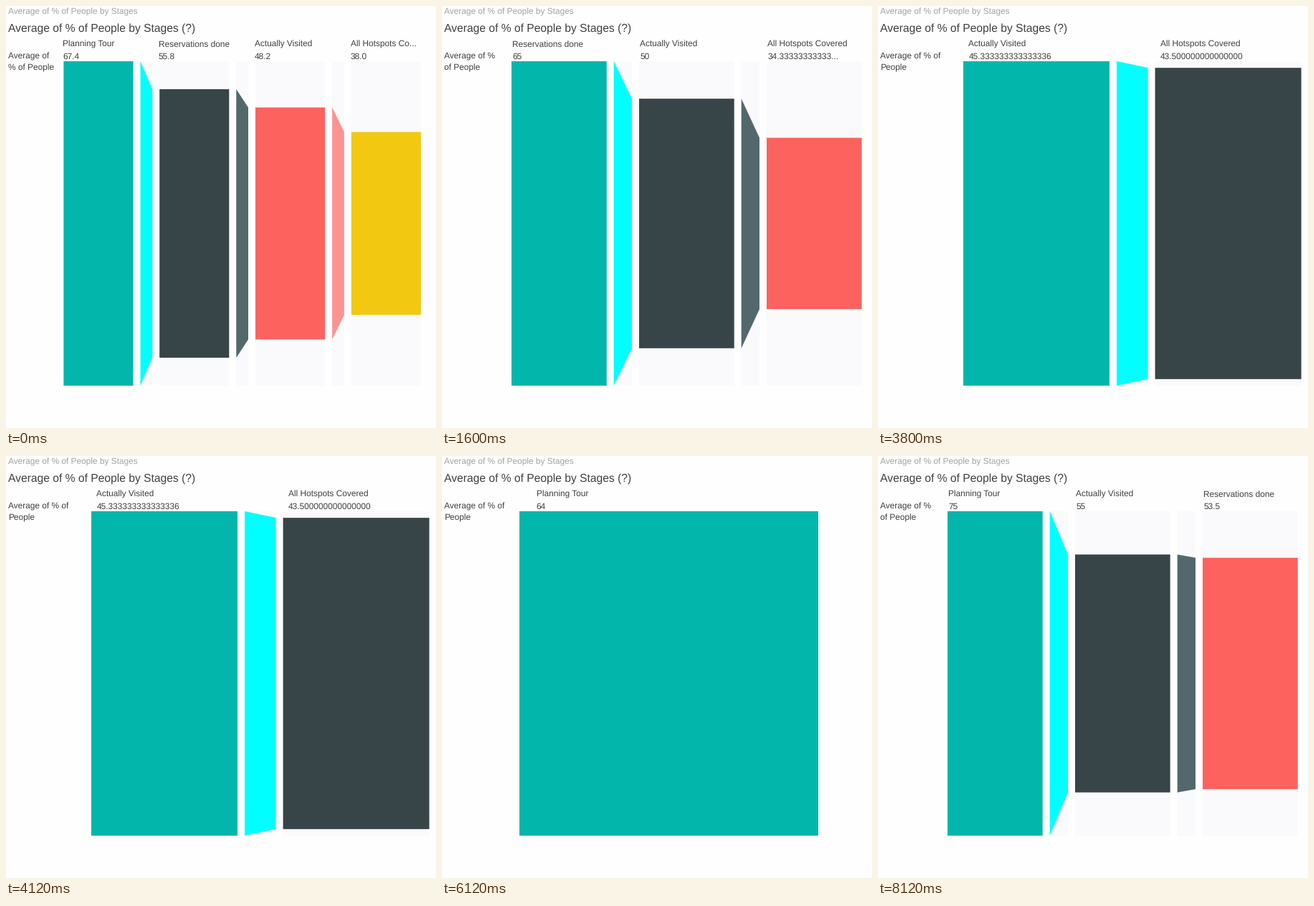
A matplotlib script that plays this animation: 600x588 px, repeating every 9.96 s.

```python
import matplotlib.pyplot as plt
from matplotlib.animation import FuncAnimation
from matplotlib.patches import Polygon

W, H, DPI = 600, 588, 96
LOOP_MS, STEP_MS = 9960, 40
TOP, BOTTOM = 77, 529
GAP = 10  # space between a bar and its connector

TRACK = "#faf9fc"
BARS = ["#02b6ab", "#374549", "#fd625e", "#f2c811"]
LINKS = ["#00ffff", "#53686c", "#fe928e"]
INK, MUTED = "#404040", "#a3a3a3"

# start ms, first bar x, bar width, pitch, label inset, row label, stages
SCENES = [
    (0, 80.4, 97.1, 133.8, -1.2, ("Average of", "% of People"),
     [("Planning Tour", "67.4"), ("Reservations done", "55.8"),
      ("Actually Visited", "48.2"), ("All Hotspots Co...", "38.0")]),
    (1600, 97, 132.7, 178, 1.3, ("Average of %", "of People"),
     [("Reservations done", "65"), ("Actually Visited", "50"),
      ("All Hotspots Covered", "34.33333333333...")]),
    (3800, 119, 204, 267.6, 7.3, ("Average of % of", "People"),
     [("Actually Visited", "45.333333333333336"),
      ("All Hotspots Covered", "43.500000000000000")]),
    (5720, 108, 417, 0, 23.5, ("Average of % of", "People"),
     [("Planning Tour", "64")]),
    (7800, 97, 132.7, 178, 1.3, ("Average of %", "of People"),
     [("Planning Tour", "75"), ("Actually Visited", "55"),
      ("Reservations done", "53.5")]),
]

plt.rcParams["font.family"] = "Liberation Sans"
plt.rcParams["text.hinting"] = "none"
fig = plt.figure(figsize=(W / DPI, H / DPI), dpi=DPI, facecolor="#fefefe")
ax = fig.add_axes([0, 0, 1, 1])
ax.set_xlim(0, W)
ax.set_ylim(H, 0)
ax.axis("off")


def text(x, baseline, s, px=11.85, color=INK):
    return ax.text(x, baseline, s, fontsize=px * 72 / DPI, color=color,
                   va="baseline", ha="left")


def column(x, width, left_h, right_h, color):
    """Vertically centred shape whose two sides may differ in height."""
    mid = (TOP + BOTTOM) / 2
    points = [(x, mid - left_h / 2), (x + width, mid - right_h / 2),
              (x + width, mid + right_h / 2), (x, mid + left_h / 2)]
    return ax.add_patch(Polygon(points, closed=True, facecolor=color,
                                linewidth=0, snap=False))


def build(x0, width, pitch, inset, row_label, stages):
    full = BOTTOM - TOP
    values = [float(value.rstrip(".")) for _, value in stages]
    heights = [full * v / values[0] for v in values]
    parts = [text(3, 74 + 16 * i, line) for i, line in enumerate(row_label)]

    for i, (name, value) in enumerate(stages):
        x = x0 + i * pitch
        parts += [column(x, width, full, full, TRACK),
                  column(x, width, heights[i], heights[i], BARS[i]),
                  text(x + inset, 57, name),
                  text(x + inset, 74, value)]
        if i + 1 < len(stages):
            link_x, link_w = x + width + GAP, pitch - width - 2 * GAP
            parts += [column(link_x, link_w, full, full, TRACK),
                      column(link_x, link_w, heights[i], heights[i + 1],
                             LINKS[i])]
    return parts


text(3, 12, "Average of % of People by Stages", color=MUTED)
text(3, 36, "Average of % of People by Stages (?)", px=15.6)
starts = [scene[0] for scene in SCENES]
groups = [build(*scene[1:]) for scene in SCENES]


def update(frame):
    now = frame * STEP_MS
    current = sum(start <= now for start in starts) - 1
    for i, group in enumerate(groups):
        for part in group:
            part.set_visible(i == current)
    return []


update(0)
anim = FuncAnimation(fig, update, frames=LOOP_MS // STEP_MS,
                     interval=STEP_MS, repeat=True, repeat_delay=0)
plt.show()
```
